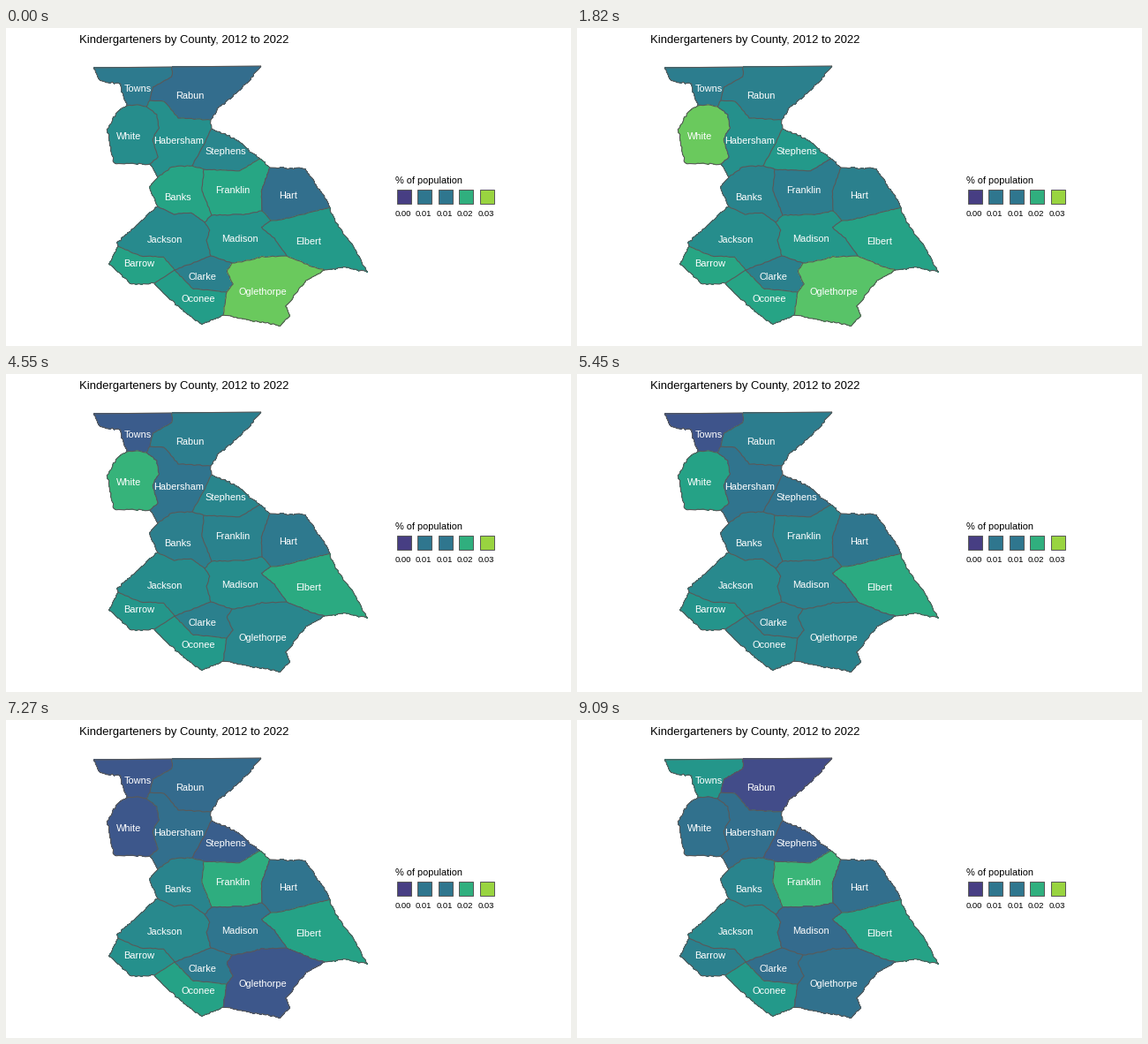
Animation of 640x360 px, one loop 10 s. Source, as a matplotlib script:

```python
import numpy as np
import matplotlib.pyplot as plt
from matplotlib.animation import FuncAnimation
from matplotlib.collections import LineCollection
from matplotlib.patches import Polygon, Rectangle

W, H, DPI = 640, 360, 100
YEARS, FRAMES, LOOP = 11, 500, 10000
EDGE = "#595959"
rng = np.random.default_rng(7)
cmap = plt.colormaps["viridis"]
plt.rcParams["font.family"] = "Liberation Sans"

# key: name, label centre, {year: position on the colour scale}
counties = {
    "T": ("Towns", 149, 68, {0: .41, 2: .42, 4: .31, 6: .25, 8: .26, 10: .53}),
    "R": ("Rabun", 208.5, 76, {0: .35, 2: .43, 6: .42, 8: .34, 9: .22}),
    "W": ("White", 139, 122, {0: .49, 2: .77, 4: .74, 6: .58, 8: .26, 10: .37}),
    "H": ("Habersham", 196, 127, {2: .50, 3: .38, 6: .38, 7: .33, 8: .36}),
    "S": ("Stephens", 249, 139, {0: .46, 2: .54, 4: .54, 6: .38, 7: .37, 8: .29}),
    "B": ("Banks", 194, 191, {0: .59, 2: .45, 6: .42, 7: .39, 8: .45}),
    "F": ("Franklin", 256.5, 183, {0: .60, 2: .42, 6: .45, 8: .63, 10: .67}),
    "N": ("Hart", 320, 189, {0: .36, 2: .43, 6: .39, 7: .33, 8: .38, 10: .36}),
    "E": ("Elbert", 342.5, 241, {0: .55, 4: .62, 7: .62, 8: .58}),
    "J": ("Jackson", 180, 239, {0: .48, 4: .50, 6: .47}),
    "M": ("Madison", 265, 238, {0: .52, 4: .55, 6: .43, 10: .34}),
    "A": ("Barrow", 151, 266, {0: .58, 2: .60, 4: .54, 8: .50, 10: .43}),
    "C": ("Clarke", 222, 281, {7: .43, 10: .36}),
    "O": ("Oconee", 218, 306, {0: .56, 4: .62, 6: .46, 7: .43, 8: .58, 10: .54}),
    "G": ("Oglethorpe", 290.5, 298, {0: .77, 4: .70, 5: .46, 7: .43, 8: .26, 9: .27, 10: .37}),
}
borders = []


def border(pair, *xy, rough=None):
    """Roughened line between two counties; "~" stands for the outside."""
    if rough is None:
        rough = 0.9 if "~" in pair else 0.5
    pts = np.reshape(xy, (-1, 2)).astype(float)
    path = pts[:1]
    for a, b in zip(pts[:-1], pts[1:]):
        n = max(1, round(np.hypot(*(b - a)) / 3))
        path = np.vstack([path, np.linspace(a, b, n + 1)[1:]])
    path[1:-1] += rng.uniform(-rough, rough, path[1:-1].shape)
    borders.append((pair, path))


border("T~", 99, 45, 188, 44, rough=0)
border("T~", 99, 45, 106, 60, 129, 63, 137, 88)
border("R~", 188, 44, 289, 43, rough=0)
border("R~", 289, 43, 268, 68, 240, 91, 232, 104)
border("W~", 137, 88, 126, 94, 115, 115, 122, 153, 163, 154)
border("H~", 163, 154, 172, 169)
border("H~", 232, 104, 233, 114)
border("S~", 233, 114, 258, 125, 288, 148)
border("F~", 288, 148, 299, 158)
border("N~", 299, 158, 338, 159, 357, 185, 367, 203)
border("E~", 367, 203, 373, 220, 392, 245, 409, 276, 385, 271, 361, 274)
border("G~", 361, 274, 340, 286, 317, 315, 322, 326, 311, 337, 246, 325)
border("O~", 246, 325, 221, 336, 181, 303, 168, 289)
border("A~", 168, 289, 142, 290, 117, 267, 127, 247)
border("J~", 127, 247, 125, 244, 172, 202)
border("B~", 172, 202, 162, 180, 172, 169)

border("TR", 188, 44, 188, 55, 166, 67, 163, 82)
border("TH", 163, 82, 159, 89)
border("TW", 159, 89, 149, 87, 137, 88)
border("RH", 163, 82, 179, 83, 195, 102, 232, 104)
border("WH", 159, 89, 171, 98, 173, 113, 166, 126, 172, 146, 163, 154)
border("HB", 172, 169, 188, 157, 211, 156)
border("HS", 233, 114, 224, 132, 211, 156)
border("SB", 211, 156, 224, 160)
border("SF", 224, 160, 264, 162, 288, 148)
border("FN", 299, 158, 289, 185, 290, 207)
border("NE", 367, 203, 312, 217, 300, 218)
border("NM", 290, 207, 300, 218)
border("EM", 300, 218, 289, 226, 304, 238, 318, 258)
border("EG", 361, 274, 347, 270, 318, 258)
border("GM", 318, 258, 290, 259, 270, 264, 256, 266)
border("CM", 256, 266, 232, 258)
border("CG", 256, 266, 250, 276, 257, 290, 250, 299)
border("CO", 250, 299, 212, 295, 191, 274)
border("OG", 250, 299, 246, 325)
border("OA", 168, 289, 191, 274)
border("JA", 127, 247, 152, 258, 178, 259, 191, 274)
border("JC", 191, 274, 232, 258)
border("JM", 225, 220, 231, 229, 227, 240, 232, 258)
border("BJ", 172, 202, 190, 211, 210, 209, 225, 220)
border("BF", 224, 160, 222, 184, 233, 212)
border("BM", 233, 212, 225, 220)
border("FM", 233, 212, 272, 211, 290, 207)


def ring(key):
    """Chain every border of one county into a closed outline."""
    parts = [path for pair, path in borders if key in pair]
    out = parts.pop(0)
    while parts:
        end = out[-1]
        i = next(i for i, p in enumerate(parts) if (p[[0, -1]] == end).all(1).any())
        p = parts.pop(i)
        out = np.vstack([out, p if (p[0] == end).all() else p[::-1]])
    return out


def shade(v):
    """Scale colour, slightly muted."""
    return 0.95 * np.array(cmap(v)[:3]) + 0.025


def px(n):
    return n * 72 / DPI


fig = plt.figure(figsize=(W / DPI, H / DPI), dpi=DPI, facecolor="white")
ax = fig.add_axes([0, 0, 1, 1])
ax.set_xlim(0, W)
ax.set_ylim(H, 0)
ax.axis("off")


def label(x, y, text, size, color="black", ha="center"):
    ax.text(x, y, text, fontsize=px(size), color=color, ha=ha, va="baseline", zorder=5)


shapes = {}
for key, (name, x, y, _) in counties.items():
    shapes[key] = ax.add_patch(Polygon(ring(key), lw=0, antialiased=False))
    label(x, y + 4, name, 11, "white")
ax.add_collection(LineCollection([path for _, path in borders], colors=EDGE,
                                 linewidths=px(1.1), zorder=3))

label(83, 17, "Kindergarteners by County, 2012 to 2022", 13, ha="left")
label(441, 176, "% of population", 11, ha="left")
legend = zip(["0.00", "0.01", "0.01", "0.02", "0.03"], [.17, .39, .39, .64, .85])
for i, (text, v) in enumerate(legend):
    x = 442 + int(23.5 * i)
    ax.add_patch(Rectangle((x + .5, 182.5), 16, 16, fc=shade(v), ec=EDGE, lw=px(1)))
    label(x + 8, 213, text, 9.5)


def draw(i):
    # each year starts on the last frame before its exact time
    year = int((i + 0.9) * YEARS / FRAMES)
    for key, (*_, trend) in counties.items():
        v = np.interp(year, list(trend), list(trend.values()))
        shapes[key].set_facecolor(shade(v))
    return list(shapes.values())


anim = FuncAnimation(fig, draw, frames=FRAMES, interval=LOOP / FRAMES,
                     repeat=True, repeat_delay=0, blit=False)
plt.show()
```
